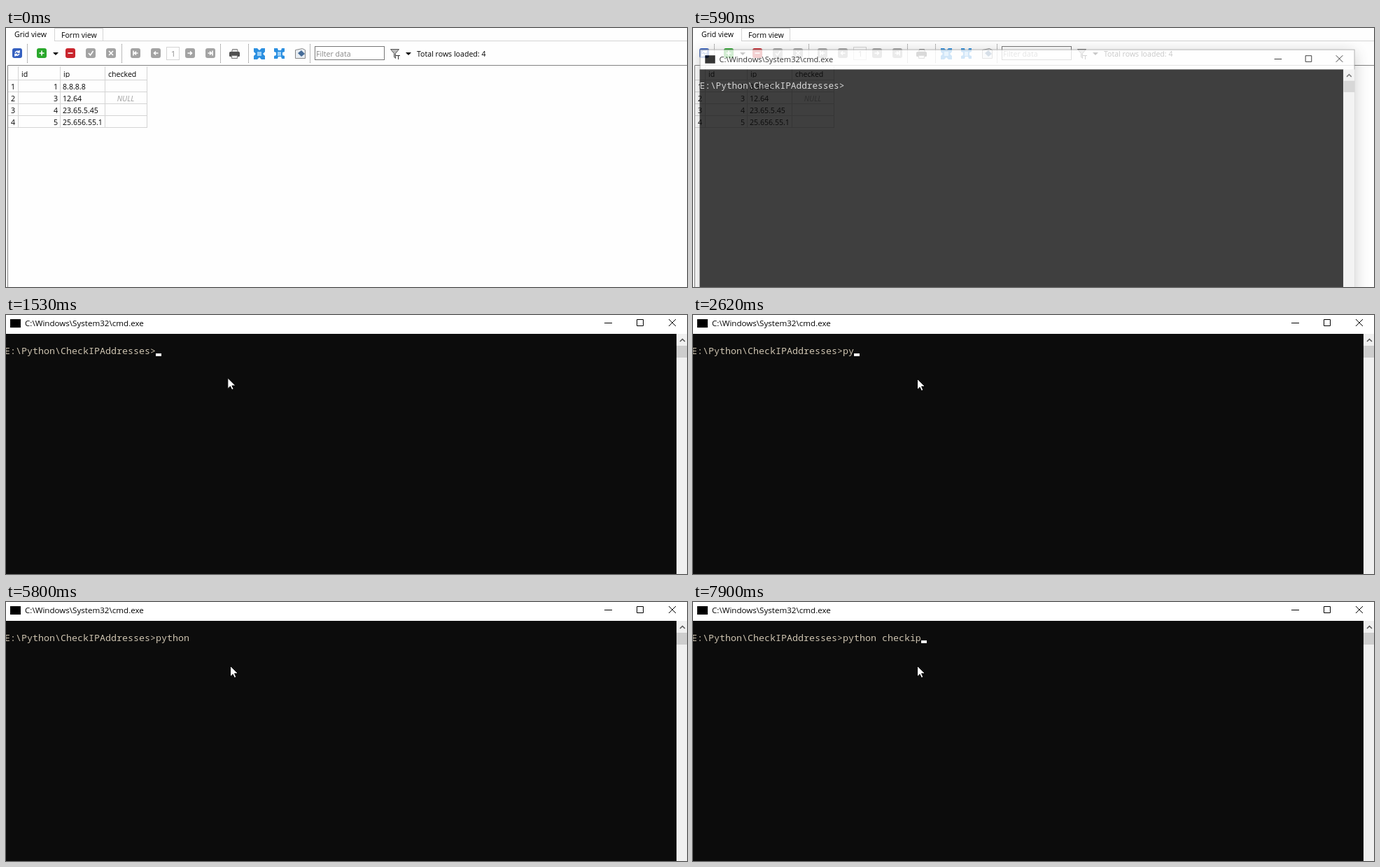
Write an HTML page that moves like this. It is 973x371 px and loops after 8000 ms.

```html
<!DOCTYPE html>
<html lang="en">
<head>
<meta charset="utf-8">
<title>Console over a data grid</title>
<style>
  html, body { margin: 0; width: 100%; height: 100%; overflow: hidden; background: #fefefe; }
  svg { display: block; }
  text { font: 10.6px "Open Sans", sans-serif; white-space: pre; }
  .title { font-size: 11.6px; }
  .mono { font: 13.333px "Noto Sans Mono", monospace; }
  .null { font-style: italic; fill: #a0a0a0; text-anchor: middle; }
  .end { text-anchor: end; }
  .dim { fill: #888; }
  .line { fill: none; stroke: #d4d4d4; }
  .frame { fill: #fff; stroke: #999; filter: drop-shadow(0 4px 11px rgba(0, 0, 0, .25)); }
</style>
</head>
<body>
<svg width="973" height="371" viewBox="0 0 973 371">
  <g id="app">
    <path class="line" d="M69.5 18V.5H138.500V18M69 18.500H973"/>
    <text x="12" y="13">Grid view</text>
    <text x="79" y="14">Form view</text>

    <path fill="none" stroke="#777" stroke-dasharray="1 1" d="M30.500 23V50M165.500 23V50M306.500 23V50M346.500 23V50M434.500 23V50"/>
    <g id="buttons"></g>
    <path d="M67 35h8l-4 4zM571 35h8l-4 4z"/>
    <rect class="line" x="229.5" y="27.5" width="18" height="18"/>
    <text class="dim" x="236" y="41">1</text>

    <path fill="#ddd" stroke="#777" d="M323.500 30.500h7l1 4h-9z"/>
    <rect x="319" y="34" width="15" height="7" rx="1.500" fill="#505050"/>
    <path fill="#eee" stroke="#777" d="M322.500 39.500h8v4h-8z"/>
    <g fill="#2b8fe0">
      <path d="M354 29h5l3 3 3-3h5v5l-3 3 3 3v5h-5l-3-3-3 3h-5v-5l3-3-3-3z"/>
      <path d="M383 29h5l1 3h4l1-3h4v5l-3 1v4l3 1v4h-4l-1-3h-4l-1 3h-5v-4l3-1v-4l-3-1z"/>
      <path fill="#9cd0f8" d="M359 34h6v6h-6zM388 34h5v6h-5z"/>
    </g>
    <path fill="#e8edf2" stroke="#888" d="M413.500 31.500l10-2 4 2v12h-14z"/>
    <path fill="#466c98" d="M417 36l5-4 5 5-5 4z"/>

    <rect x="441.500" y="26.500" width="99" height="19" fill="#fff" stroke="#777"/>
    <text class="dim" x="443" y="41">Filter data</text>
    <path fill="#bbb" stroke="#555" d="M549.500 30.500h12l-5 6v7l-2-2v-5z"/>
    <path fill="none" stroke="#333" d="M557 39.500h6M560.500 39v6"/>
    <text x="587" y="41">Total rows loaded: 4</text>

    <path fill="none" stroke="#828282" d="M973 53.500H2.500V371"/>
    <path class="line" d="M17.500 55V142M77.500 55V142M141.500 55V142M201.500 55V142M3 74.500H202M3 91.500H202M3 108.500H202M3 125.500H202M3 142.500H202"/>
    <text x="22" y="70">id</text>
    <text x="82" y="70">ip</text>
    <path fill="#fefefe" d="M80 71h15v3h-15z"/>
    <text x="146" y="70">checked</text>
    <g id="rows"></g>
    <text class="null" x="171" y="105">NULL</text>
  </g>

  <g id="win">
    <rect class="frame" x=".5" y=".5" width="976" height="520"/>
    <rect x="8" y="9" width="15" height="12"/>
    <text class="title" x="29" y="19">C:\Windows\System32\cmd.exe</text>
    <path fill="none" stroke="#000" d="M857 14.500h11M903.500 9.500h9v9h-9zM949 9l10 10M959 9l-10 10"/>
    <rect y="30" width="960" height="490" fill="#0c0c0c"/>
    <rect x="960" y="30" width="17" height="490" fill="#f0f0f0"/>
    <rect x="960" y="47" width="17" height="17" fill="#cdcdcd"/>
    <path fill="none" stroke="#555" stroke-width="1.500" d="M965 41l3.500-3.500 3.500 3.500"/>
    <text class="mono" id="command" x="0" y="59"></text>
    <rect id="caret" y="58" width="8" height="4" fill="#f2f2f2"/>
  </g>
  <path id="mouse" fill="#fff" stroke="#000" d="M.5 .5v15.500l3.600-3.400 2.300 5 2.500-1.100-2.300-4.900h5z"/>
</svg>

<script>
const LOOP = 8000;
const PROMPT = 'E:\\Python\\CheckIPAddresses>';
const TYPED = 'python checkip';
const KEY_TIMES = [2240, 2620, 2940, 3170, 3460, 3950, 4240, 6110, 6450, 6640, 6970, 7200, 7580, 7900];
const BLINKS = [0, 1060, 1600, 2070, 3630, 4100, 4720, 5250, 5800, 6330, 6860, 7390];
// Opening zoom of the window: start time, x, y, scale, opacity
const POSES = [
  [500, 45, 129, .829, .152],
  [590, 9.6, 30.6, .958, .786],
  [680, -.5, 2.2, .993, .967],
  [760, -2, -3, 1, 1]
];
const MOUSE = { start: 1060, end: 2070, from: [296, 82], to: [320, 91] };

const GRAY = '#a3a3a3';
const BUTTONS = [
  [9, '#3560c0', 'M4 6.500q3-4 6-1M10 3v3h-3M10 8q-3 4-6 1M4 11.500v-3h3'],
  [44, '#2aa82c', 'M7 3.500v7M3.500 7h7'],
  [85, '#c9252d', 'M3.500 7h7'],
  [114, GRAY, 'M4 7l2.500 3 4-6'],
  [143, GRAY, 'M4 4l6 6M10 4l-6 6'],
  [178, GRAY, 'M4 3.500v7M10.500 7h-5M8 4.500l-2.500 2.500 2.500 2.500'],
  [207, GRAY, 'M10.500 7h-6M7 4.500l-2.500 2.500 2.500 2.500'],
  [256, GRAY, 'M3.500 7h6M7 4.500l2.500 2.500-2.500 2.500'],
  [285, GRAY, 'M10 3.500v7M3.500 7h5M6 4.500l2.500 2.500-2.500 2.500']
];
const ROWS = [[1, '8.8.8.8'], [3, '12.64'], [4, '23.65.5.45'], [5, '25.656.55.1']];

const el = id => document.getElementById(id);

el('buttons').innerHTML = BUTTONS.map(([x, color, sign]) =>
  `<g transform="translate(${x} 29)"><rect width="14" height="14" rx="3" fill="${color}"/>
   <path d="${sign}" fill="none" stroke="#fff" stroke-width="1.600"/></g>`).join('');

el('rows').innerHTML = ROWS.map(([id, ip], i) => {
  const y = 88 + 17 * i;
  return `<text x="7" y="${y}">${i + 1}</text><text class="end" x="74" y="${y}">${id}</text>
    <text x="81" y="${y}">${ip}</text>`;
}).join('');

function show(node, on) {
  node.style.display = on ? '' : 'none';
}

function drawWindow(t) {
  const pose = POSES.filter(p => p[0] <= t).pop();
  show(el('win'), pose);
  if (!pose) return;
  const [, x, y, scale, opacity] = pose;
  el('win').setAttribute('transform', `translate(${x} ${y}) scale(${scale})`);
  el('win').style.opacity = opacity;
  el('command').style.fill = opacity < 1 ? '#ccc' : '#cdc3b0';
}

function drawCommand(t) {
  const keys = KEY_TIMES.filter(k => k <= t);
  const lastKey = keys.length ? keys[keys.length - 1] : 0;
  // Each key shows the caret again; every later blink toggles it
  const toggles = BLINKS.filter(b => b >= lastKey && b <= t).length;
  el('command').textContent = PROMPT + TYPED.slice(0, keys.length);
  el('caret').setAttribute('x', 8 * (PROMPT.length + keys.length));
  show(el('caret'), toggles % 2 === 0);
}

function drawMouse(t) {
  const { start, end, from, to } = MOUSE;
  const p = Math.min(1, Math.max(0, (t - start) / (end - start)));
  const ease = 1 - (1 - p) ** 3;
  const [x, y] = from.map((a, i) => a + (to[i] - a) * ease);
  el('mouse').setAttribute('transform', `translate(${x} ${y})`);
  show(el('mouse'), t >= start);
}

function draw() {
  const t = performance.now() % LOOP;
  drawWindow(t);
  drawCommand(t);
  drawMouse(t);
  requestAnimationFrame(draw);
}
draw();
</script>
</body>
</html>
```
